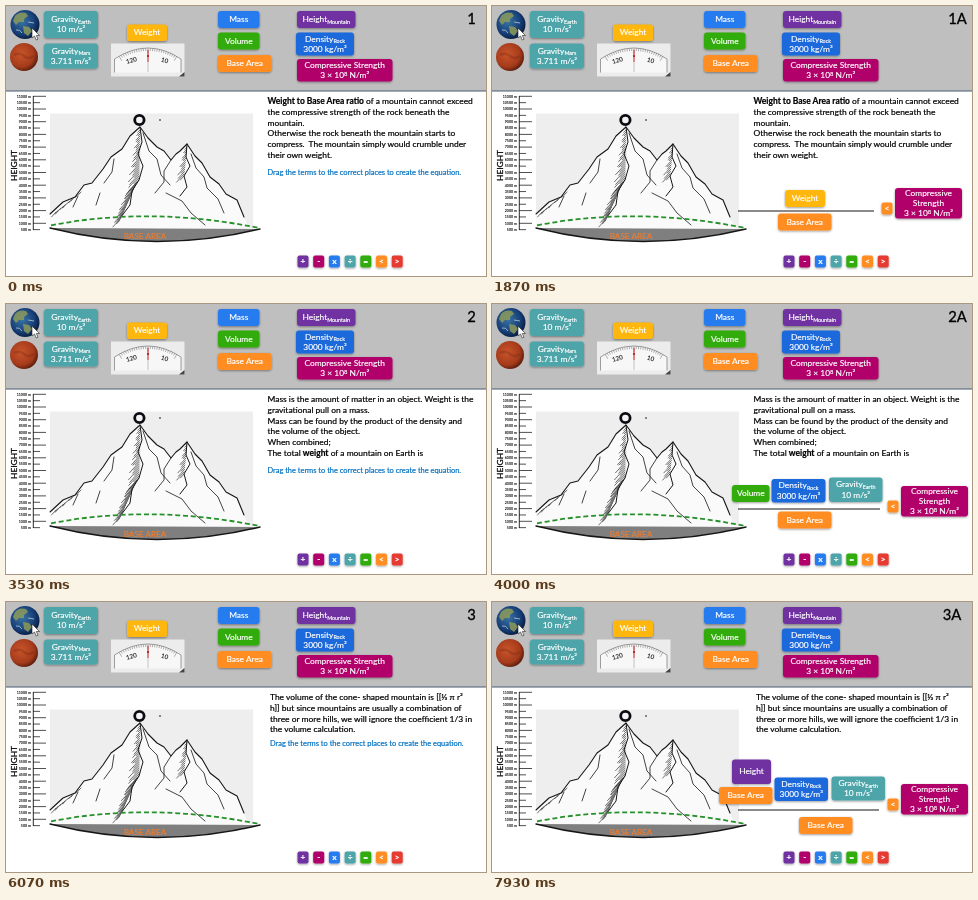
An HTML page for the animation above (8 s loop, 480 by 270 pixels).

```html
<!DOCTYPE html>
<html lang="en">
<head>
<meta charset="utf-8">
<style>
html, body { margin: 0; width: 100%; height: 100%; overflow: hidden; background: #fff; }
svg { display: block; width: 100vw; height: 100vh; font-family: Lato, "Open Sans", sans-serif; }
.label { font-size: 8.4px; fill: #fff; stroke: #fff; stroke-width: .2; text-anchor: middle; }
.copy { font-size: 8.45px; fill: #000; stroke: #000; stroke-width: .2; }
.hint { font-size: 7.45px; fill: #0070c0; stroke: #0070c0; stroke-width: .2; }
.page { font-size: 14.8px; stroke: #000; stroke-width: .3; text-anchor: middle; }
.ink { fill: none; stroke: #161616; stroke-linecap: round; stroke-linejoin: round; }
</style>
</head>
<body>
<svg id="stage" viewBox="0 0 480 270" xmlns="http://www.w3.org/2000/svg"></svg>
<script>
const C = {
  teal: '#4ea5a9', yellow: '#ffb608', blue: '#287bee', green: '#31ab0d', orange: '#ff8d20',
  purple: '#7030a0', rock: '#1c69dc', magenta: '#b2006b', red: '#e63b30'
};
const lerp = (a, b, t) => a + (b - a) * t;
const range = (n, fn) => Array.from({ length: n }, (_, i) => fn(i)).join('');
const line = (x1, y1, x2, y2, width = .6, color = '#161616') =>
  `<line x1="${x1}" y1="${y1}" x2="${x2}" y2="${y2}" stroke="${color}" stroke-width="${width}"/>`;
const ink = (d, width = .8) => `<path class="ink" d="${d}" stroke-width="${width}"/>`;

// "_name" becomes a subscript, "^8" a superscript.
const rich = text => text
  .replace(/_(\w+)/, '<tspan font-size="5.4" dy="1.5">$1</tspan>')
  .replace(/\^(\d)/, '<tspan font-size="5.8" dy="-2.6">$1</tspan><tspan dy="2.6">&#8203;</tspan>');

function tile(x, y, right, bottom, color, ...lines) {
  const cx = (x + right) / 2, cy = (y + bottom) / 2, pitch = 10.3;
  return `<rect x="${x}" y="${y}" width="${right - x}" height="${bottom - y}" rx="3" fill="${color}" filter="url(#shadow)"/>` +
    lines.map((text, i) =>
      `<text class="label" x="${cx}" y="${cy + 2.7 + (i - (lines.length - 1) / 2) * pitch}">${rich(text)}</text>`).join('');
}

function symbol(x, y, color, sign) {
  return `<rect x="${x - 5.5}" y="${y - 6}" width="11" height="12" rx="2" fill="${color}" filter="url(#shadow)"/>
    <text class="label" x="${x}" y="${y + 2.7}" font-weight="700">${sign}</text>`;
}

const density = (x, y, r, b) => tile(x, y, r, b, C.rock, 'Density_Rock', '3000 kg/m³');
const gravity = (x, y, r, b) => tile(x, y, r, b, C.teal, 'Gravity_Earth', '10 m/s²');
const baseArea = (x, y) => tile(x, y, x + 53.5, y + 17, C.orange, 'Base Area');
const strength = x => symbol(x - 8, 202.5, C.orange, '&lt;') +
  tile(x, 182, x + 67, 212.5, C.magenta, 'Compressive', 'Strength', '3 × 10^8 N/m²');

function planets() {
  return `
    <circle cx="19" cy="18.5" r="14.5" fill="url(#earth)"/>
    <g fill="#8c9a5a" opacity=".85">
      <path d="M9 10 Q13 5 20 7 L22 10 L18 13 L18 16 L13 16 L10 19 L7 15Z"/>
      <path d="M17 20 L23 21 L26 25 L22 30 L18 27Z"/>
    </g>
    <path d="M10 24 Q14 23 16 27 M22 16 L28 17" stroke="#b8cbd8" stroke-width=".8" fill="none"/>
    <path d="M26 22 V32 L28.5 30 L30.3 34 L32 33.2 L30.3 29.5 H33.5Z" fill="#fff" stroke="#222" stroke-width=".6"/>
    <circle cx="18" cy="51" r="14" fill="url(#mars)"/>
    <path d="M8 49 Q14 46 18 50 T28 50" stroke="#6d2410" stroke-width="2.5" opacity=".3" fill="none"/>`;
}

function scale() {
  const ticks = range(27, i => {
    const a = lerp(-.54, .54, i / 26), outer = 56, inner = i % 13 ? 53.5 : 51;
    const at = radius => [142 + radius * Math.sin(a), 98.5 - radius * Math.cos(a)];
    return line(...at(outer), ...at(inner), .45, '#555');
  });
  return `
    <rect x="105" y="37.5" width="73.5" height="33" fill="#ececec"/>
    <path d="M108.5 66.5 V53 Q142 31 175 53 V66.5" fill="#f7f7f7" stroke="#777" stroke-width=".7"/>
    ${ticks}
    <g font-size="6.4" font-weight="700" fill="#333" text-anchor="middle">
      <text transform="translate(126 56.5) rotate(-16)">120</text>
      <text transform="translate(158 56.5) rotate(16)">10</text>
    </g>
    ${line(142, 43, 142, 66, .5, '#888')}
    ${line(142, 44, 142, 56, .9, '#d52420')}
    <circle cx="142" cy="50" r="1.1" fill="#a51d1a"/>
    <path d="M178.5 66 V70.5 H173Z" fill="#444"/>`;
}

function ruler() {
  return line(27.3, 90, 27.3, 224, .9) + range(22, i => {
    const y = 90.3 + i * 6.35;
    return line(27, y, i % 2 ? 34 : 40, y, .75) +
      `<text x="25" y="${y + 1.3}" font-size="3.6" font-weight="700" text-anchor="end">${11000 - i * 500} m</text>`;
  }) + '<text transform="translate(10.7 159.5) rotate(-90)" font-size="8.4" text-anchor="middle" stroke="#000" stroke-width=".25">HEIGHT</text>';
}

function mountain() {
  // Slanted strokes hanging to the left of an edge, widening on the way down.
  const shade = (n, x1, y1, x2, y2, from, to) => range(n, i => {
    const t = i / (n - 1), x = lerp(x1, x2, t), y = lerp(y1, y2, t);
    const w = lerp(from, to, t) * (.7 + .3 * Math.sin(i * 2.3));
    return ink(`M${x} ${y} l${-w} ${w * 1.1}`, .6);
  });
  const ridge = `M44 208 L57 196 L69 191 L78 179 L86 177 L97 163 L105 151 L116 143 L124 130 L134 121 L142 132 L151 141 L158 145
    L165 154 L170 148 L174 145 L181 138 L189 150 L196 157 L204 171 L213 178 L220 188 L231 194 L238 211`;
  return `
    <rect x="44" y="107.5" width="203" height="115" fill="#eee"/>
    <path d="${ridge} L243 222 H44Z" fill="#fafafa"/>
    ${ink(ridge, 1.1)}
    ${shade(26, 134, 124, 133, 174, 3, 13)}
    ${shade(22, 131, 176, 114, 214, 12, 8)}
    ${shade(14, 181, 141, 178, 170, 3, 9)}
    ${shade(12, 75, 186, 50, 206, 3, 6)}
    ${ink('M134 121 L136 136 L132 148 L137 160 L133 174 L126 185 L124 199 L115 211', 1)}
    ${ink('M137 127 L143 145 L151 153 L155 169 L164 179')}
    ${ink('M181 138 L180 151 L184 160 L178 170 L181 181 L174 190', 1)}
    ${ink('M165 154 L158 165 L158 176 L149 187')}
    ${ink('M185 148 L190 162 L198 171 L201 182 L212 193 L218 207')}
    ${ink('M108 153 L106 166 L98 177 M94 187 L90 199 M72 190 L67 201')}
    ${ink('M160 187 L176 195 L185 207 L199 219')}
    <path d="M44 222 Q149 248.5 254 223Z" fill="#7f7f7f"/>
    ${ink('M44 222 Q149 248.5 254 223', 1.4)}
    <path d="M45 219.3 Q145 200 253 222" fill="none" stroke="#26912b" stroke-width="1.8" stroke-dasharray="5 2.8"/>
    <text x="139" y="232.6" text-anchor="middle" font-size="8.2" fill="#ed7d31" stroke="#ed7d31" stroke-width=".2">BASE AREA</text>
    <circle cx="133.4" cy="114" r="4.7" fill="#f4f4f4" stroke="#0c0c12" stroke-width="2.8"/>
    <circle cx="154" cy="114" r=".8"/>`;
}

const header = `
  <rect width="480" height="85" fill="#bfbfbf"/>
  ${line(0, 85, 480, 85, 1, '#4b5a70')}
  ${planets()}
  ${tile(38, 5, 92, 32, C.teal, 'Gravity_Earth', '10 m/s²')}
  ${tile(38, 37.5, 92, 62.5, C.teal, 'Gravity_Mars', '3.711 m/s²')}
  ${scale()}
  ${tile(121, 18.5, 161, 35, C.yellow, 'Weight')}
  ${tile(212, 5, 253.5, 22, C.blue, 'Mass')}
  ${tile(212, 26.5, 253.5, 43.5, C.green, 'Volume')}
  ${baseArea(212, 49)}
  ${tile(291, 5, 349.5, 22, C.purple, 'Height_Mountain')}
  ${density(290, 26.5, 348, 49.5)}
  ${tile(291, 53, 386.5, 75.5, C.magenta, 'Compressive Strength', '3 × 10^8 N/m²')}`;

const signs = [['+', C.purple], ['-', C.magenta], ['x', C.blue], ['÷', C.teal], ['=', C.green], ['&lt;', C.orange], ['&gt;', C.red]]
  .map(([sign, color], i) => symbol(297 + i * 15.7, 255.5, color, sign)).join('');

const topics = [
  { x: 261.5, hintY: 168.8, lines: [
    '<tspan font-weight="700">Weight to Base Area ratio</tspan> of a mountain cannot exceed',
    'the compressive strength of the rock beneath the', 'mountain.',
    'Otherwise the rock beneath the mountain starts to',
    'compress.  The mountain simply would crumble under', 'their own weight.'] },
  { x: 261.5, hintY: 168.8, lines: [
    'Mass is the amount of matter in an object. Weight is the', 'gravitational pull on a mass.',
    'Mass can be found by the product of the density and', 'the volume of the object.', 'When combined;',
    'The total <tspan font-weight="700">weight</tspan> of a mountain on Earth is'] },
  { x: 264, hintY: 143.7, lines: [
    'The volume of the cone- shaped mountain is [[⅓ π r²',
    'h]] but since mountains are usually a combination of',
    'three or more hills, we will ignore the coefficient 1/3 in', 'the volume calculation.'] }
];

const answers = [
  tile(293, 184, 333, 201, C.yellow, 'Weight') + line(246, 205, 382, 205, 1.1) + baseArea(286, 207.5) + strength(403),
  tile(240, 181, 277.5, 198, C.green, 'Volume') + density(279.5, 175, 333.5, 198.5) + gravity(337, 173.5, 390.5, 198) +
    line(246, 205, 388, 205, 1.1) + baseArea(286, 207.5) + strength(409),
  tile(240, 157.5, 279, 182, C.purple, 'Height') + baseArea(227, 185) + density(282.5, 175.5, 336, 199) +
    gravity(339.5, 174.5, 393, 198.5) + line(246, 208, 387, 208, 1.1) + baseArea(307, 215) + strength(409)
];

function slide(index) {
  const n = index >> 1, solved = index % 2, { x, hintY, lines } = topics[n];
  const pageX = solved && n === 2 ? 460 : 465.5;
  return `<g class="slide" visibility="hidden">
    <text class="page" x="${pageX}" y="17.6">${n + 1}${solved ? 'A' : ''}</text>
    ${lines.map((text, i) => `<text class="copy" x="${x}" y="${98 + i * 10.75}" xml:space="preserve">${text}</text>`).join('')}
    ${solved ? answers[n] : `<text class="hint" x="${x}" y="${hintY}">Drag the terms to the correct places to create the equation.</text>`}
  </g>`;
}

document.getElementById('stage').innerHTML = `
  <defs>
    <filter id="shadow" x="-20%" y="-30%" width="140%" height="170%">
      <feDropShadow dx="0" dy=".9" stdDeviation=".8" flood-opacity=".4"/>
    </filter>
    <radialGradient id="earth" cx=".4" cy=".4" r=".65"><stop stop-color="#3a74a4"/><stop offset=".65" stop-color="#173f78"/><stop offset="1" stop-color="#071a3b"/></radialGradient>
    <radialGradient id="mars" cx=".4" cy=".4" r=".65"><stop stop-color="#c9552a"/><stop offset=".7" stop-color="#a53b1b"/><stop offset="1" stop-color="#541b0c"/></radialGradient>
  </defs>
  <rect width="480" height="270" fill="#fff"/>
  ${header}${ruler()}${mountain()}${signs}${range(6, slide)}`;

const slides = [...document.querySelectorAll('.slide')];
const LOOP = 8000, start = performance.now();

function draw(now) {
  const time = Math.max(0, now - start) % LOOP;
  // The small lead keeps each cut on the 10 ms clock of the loop.
  const current = Math.min(5, Math.floor((time + 4) / (LOOP / 6)));
  slides.forEach((el, i) => el.setAttribute('visibility', i === current ? 'visible' : 'hidden'));
  requestAnimationFrame(draw);
}
draw(start);
</script>
</body>
</html>
```
